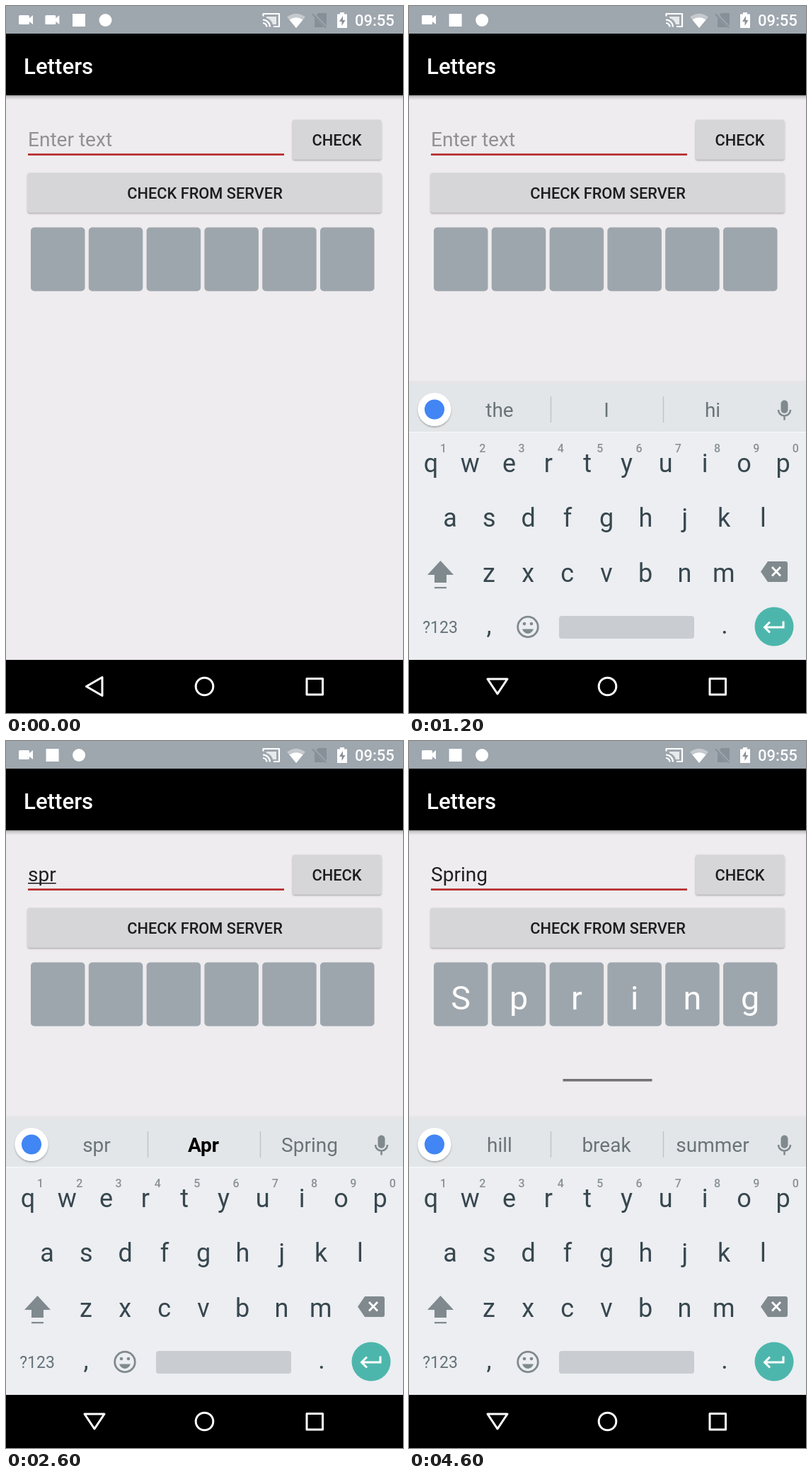
An HTML page that plays this animation: 561x998 px, repeating every 5.1 s.

```html
<!DOCTYPE html>
<html lang="en">
<head>
<meta charset="utf-8">
<title>Letters</title>
<style>
html, body { margin: 0; width: 100%; height: 100%; overflow: hidden; background: #eeecee; }
svg { display: block; width: 561px; height: 998px; font-family: Roboto, sans-serif; }
.mid { text-anchor: middle; }
.med { font-weight: 500; }
.field { font-size: 28.05px; }
.btn { font-size: 21.8px; font-weight: 500; fill: #1c1c1c; text-anchor: middle; }
.tile { font-size: 46.7px; fill: #fff; text-anchor: middle; }
.key { font-size: 36px; fill: #37474f; text-anchor: middle; }
.hint { font-size: 16px; font-weight: 500; fill: #8a9296; text-anchor: middle; }
.word { font-size: 28px; fill: #6a7478; text-anchor: middle; }
.word.best { font-weight: 700; fill: #000; }
.line { fill: none; stroke: #fff; stroke-width: 3; stroke-linejoin: round; }
.icon { fill: #808a8e; }
</style>
</head>
<body>
<svg viewBox="0 0 561 998">
  <defs>
    <linearGradient id="fall" x2="0" y2="1">
      <stop stop-opacity=".32"/><stop offset=".4" stop-opacity=".12"/><stop offset="1" stop-opacity="0"/>
    </linearGradient>
    <filter id="lift" x="-10%" y="-20%" width="120%" height="150%">
      <feDropShadow dx="0" dy="1.5" stdDeviation="1.2" flood-opacity=".32"/>
    </filter>
    <g id="cam"><rect x="18" y="13" width="15" height="13" rx="1.5"/><path d="M32 18l6-5v13l-6-5z"/></g>
  </defs>

  <rect width="561" height="998" fill="#eeecee"/>
  <rect y="126" width="561" height="7" fill="url(#fall)"/>
  <rect y="39" width="561" height="87"/>
  <text class="med" x="25" y="95.5" font-size="31.2" fill="#fff">Letters</text>

  <g id="status" fill="#fff">
    <rect width="561" height="39" fill="#9ea6ae"/>
    <use href="#cam"/>
    <use id="cam2" href="#cam" x="37.4"/>
    <g id="notes"><rect x="94" y="11" width="18" height="18"/><circle cx="140.5" cy="20" r="9"/></g>
    <path class="line" style="stroke-width:2.2" d="M363.5 14.500v-3.500h22.500v18h-8M363 19.500a10 10 0 0 1 10 10M363 24a5.500 5.500 0 0 1 5.500 5.500"/>
    <path d="M368 15h14v11h-5q-2-7-9-9z" opacity=".75"/>
    <path d="M397 15.500q13-9.500 26 0L410 31z" opacity=".4"/>
    <path d="M400.500 19.500q9.500-6.500 19 0L410 31z"/>
    <path d="M441 10h12v20h-17V16z" fill="#879098"/>
    <path d="M434 11l19 20" stroke="#9ea6ae" stroke-width="4"/>
    <path d="M433 11.500l19 19" stroke="#879098" stroke-width="2"/>
    <path d="M468 11.500h4V9h6v2.500h4V31h-14z"/>
    <path d="M476 14l-5 8h3.500v6l5-8H476z" fill="#8a939b"/>
    <text class="med" x="493" y="28" font-size="22">09:55</text>
  </g>

  <text id="prompt" class="field" x="31" y="197.500" fill="#929092">Enter text</text>
  <text id="entry" class="field" x="31" y="197.500" fill="#212121"></text>
  <rect id="under" x="31" y="200" height="1.600" fill="#212121"/>
  <rect x="31" y="208.300" width="362" height="2.700" fill="#b62c2d"/>
  <rect id="caret" y="167" width="2.600" height="38" fill="#bf3030"/>

  <g fill="#d6d5d7" filter="url(#lift)">
    <rect x="405" y="160.500" width="125.500" height="56" rx="3"/>
    <rect x="30.500" y="235.500" width="500" height="56" rx="3"/>
  </g>
  <text class="btn" x="467.500" y="197">CHECK</text>
  <text class="btn" x="281" y="272">CHECK FROM SERVER</text>
  <g id="tiles"></g>
  <g id="letters"></g>
  <rect id="dash" x="217.500" y="477" width="126" height="3.500" fill="#757073"/>

  <rect y="923" width="561" height="75"/>
  <g id="board">
    <rect y="529" width="561" height="4" fill="#000" opacity=".03"/>
    <rect y="533" width="561" height="390" fill="#eceef1"/>
    <rect y="533" width="561" height="69" fill="#e3e6e8"/>
    <rect y="601" width="561" height="1.500" fill="#f5f6f7"/>
    <rect y="923" width="561" height="75"/>
    <rect id="press" fill="#d3d8dc" rx="3"/>
    <circle cx="36" cy="569.500" r="23.500" fill="#fff" filter="url(#lift)"/>
    <circle cx="36" cy="569.500" r="14" fill="#4285f4"/>
    <path d="M200.500 551v37M359.500 551v37" stroke="#c0c5c8" stroke-width="1.500"/>
    <g id="words"></g>
    <g class="icon">
      <rect x="525.500" y="556.500" width="10" height="18.500" rx="5"/>
      <path d="M522 570a8.500 8.500 0 0 0 17 0M530.500 578.500v6" fill="none" stroke="#808a8e" stroke-width="2.600"/>
      <path d="M44.500 783L63 803H53v11H36v-11H26zM36 820h17v2.200H36z"/>
      <path d="M507 784h25q3 0 3 3v23q0 3-3 3h-25l-10-14.500z"/>
    </g>
    <path d="M513 792l12 12.500M525 792l-12 12.500" stroke="#fff" stroke-width="2.800"/>
    <g id="keys"></g>
    <text class="mid" x="44" y="885" font-size="23" fill="#65727a">?123</text>
    <text class="key" x="113" y="886">,</text>
    <text class="key" x="446" y="886">.</text>
    <circle cx="168" cy="876.500" r="14.300" fill="none" stroke="#808a8e" stroke-width="2.800"/>
    <g class="icon">
      <circle cx="163" cy="872" r="2.300"/><circle cx="173" cy="872" r="2.300"/>
      <path d="M160 879.500h16q-2.500 6.500-8 6.500t-8-6.500z"/>
    </g>
    <rect x="212" y="861" width="191" height="32" rx="4" fill="#c9ccd1"/>
    <circle cx="516" cy="876" r="27.500" fill="#4db6ac"/>
    <path class="line" style="stroke-linejoin:miter" d="M529 868.500v8.500h-26M510 869.500l-7.500 7.500 7.500 7.500"/>
  </g>
  <path id="back" class="line"/>
  <circle class="line" cx="280.500" cy="960.500" r="12.300"/>
  <rect class="line" x="425" y="949.500" width="22.500" height="22.500"/>
</svg>
<script>
const LOOP = 5100, STEP = 100;
const $ = id => document.getElementById(id);

function add(parent, tag, attrs, text = '') {
  const el = document.createElementNS('http://www.w3.org/2000/svg', tag);
  for (const name in attrs) el.setAttribute(name, attrs[name]);
  el.textContent = text;
  return parent.appendChild(el);
}
const set = (id, attrs) => { for (const name in attrs) $(id).setAttribute(name, attrs[name]); };
const show = (id, on) => set(id, { opacity: +on });

[...'Spring'].forEach((ch, i) => {
  const x = 35 + i * 81.8;
  add($('tiles'), 'rect', { x, y: 312.5, width: 76.5, height: 90, rx: 5, fill: '#9ea6ad' });
  add($('letters'), 'text', { class: 'tile', x: x + 38.2, y: 379 }, ch);
});

const PITCH = 55.3, keyX = {};
[['qwertyuiop', 31, 657.5], ['asdfghjkl', 58, 735], ['zxcvbnm', 113, 812.5]].forEach(([row, left, y]) => {
  [...row].forEach((ch, i) => {
    keyX[ch] = left + i * PITCH;
    add($('keys'), 'text', { class: 'key', x: keyX[ch], y }, ch);
  });
});
[...'1234567890'].forEach((n, i) =>
  add($('keys'), 'text', { class: 'hint', x: 48.5 + i * PITCH, y: 629.5 }, n));

const words = [128, 279, 429].map(x => add($('words'), 'text', { class: 'word', x, y: 580 }));

// start, typed text, suggestions, composing
const typing = [
  [0, '', 'the I hi', false],
  [1300, 's', 's so see', true],
  [1700, 'sp', 'sp so SP', true],
  [2100, 'spr', 'spr Apr Spring', true],
  [3000, 'Spring', 'hill break summer', false]
];
const caretOn = [[500, 1000], [1300, 2600], [3000, 3600], [4100, 4600]];
const keyBox = (ch, y) => ({ x: keyX[ch] - 27, y, width: 54, height: 75 });
const presses = {
  1300: keyBox('s', 683),
  1700: keyBox('p', 605),
  2100: keyBox('r', 605),
  2900: { x: 360, y: 534, width: 141, height: 67 }
};

function render(t) {
  const [, text, tips, composing] = typing.filter(s => s[0] <= t).pop();
  $('entry').textContent = text;
  const width = text ? $('entry').getComputedTextLength() : 0;
  show('prompt', !text);
  show('under', composing);
  set('under', { width });
  set('caret', { x: 31 + width });
  show('caret', caretOn.some(([a, b]) => t >= a && t < b));

  tips.split(' ').forEach((tip, i) => {
    words[i].textContent = tip;
    words[i].classList.toggle('best', composing && i === 1);
  });
  show('press', t in presses);
  if (t in presses) set('press', presses[t]);

  const rest = t < 300 ? 1 : 1 - Math.min(1, (t - 260) / 540);
  set('board', {
    transform: `translate(0 ${(46 * rest ** 2).toFixed(2)})`,
    opacity: 1 - rest ** 2.6
  });
  set('back', { d: t < 300 ? 'M113.500 960.500l22.500-13v26z' : 'M111 950h28l-14 21z' });

  show('cam2', t < 100);
  set('notes', { transform: `translate(${t < 100 ? 0 : -37.4} 0)` });
  show('letters', t >= 3700);
  set('dash', { opacity: t < 3700 ? 0 : t < 3800 ? 0.5 : 1 });
}

const start = performance.now();
let last = -1;
function tick() {
  const t = Math.floor((performance.now() - start) % LOOP / STEP) * STEP;
  if (t !== last) render(last = t);
  requestAnimationFrame(tick);
}
tick();
</script>
</body>
</html>
```
